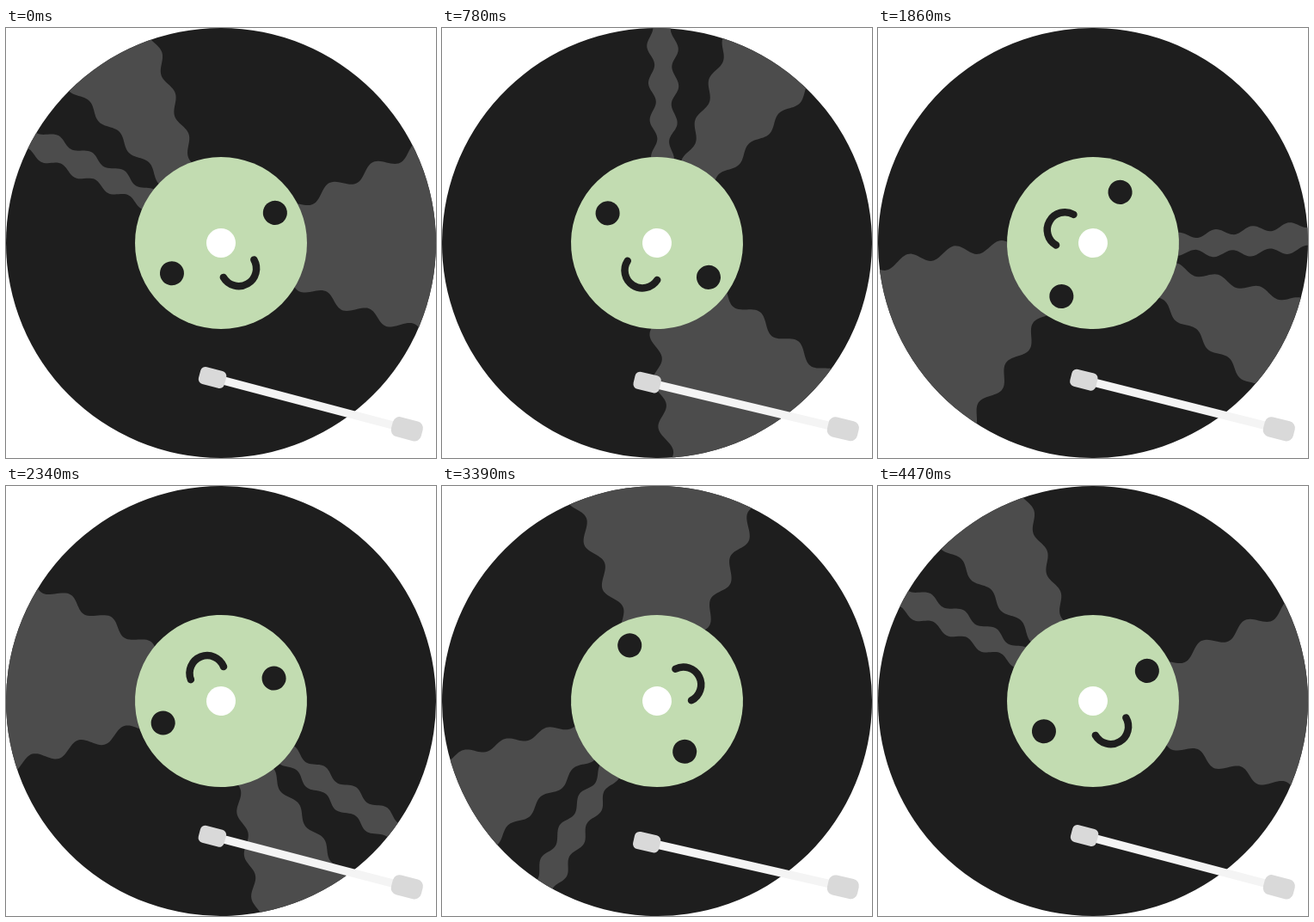
Animation, 500 px wide and 500 px high, one loop 4.5 s. Source, as an HTML page with a canvas:

```html
<!DOCTYPE html>
<html lang="en">
<head>
<meta charset="utf-8">
<title>Smiling record</title>
<style>
  html, body { margin: 0; width: 100%; height: 100%; overflow: hidden; background: #fff; }
  canvas { display: block; }
</style>
</head>
<body>
<canvas id="stage" width="500" height="500"></canvas>
<script>
const ctx = document.getElementById('stage').getContext('2d');
const TAU = Math.PI * 2, DEG = Math.PI / 180;
const STEP = 30, STEPS = 150;
const DISC = 250, LABEL = 100;

// A wavy spoke: its angle at the label and at the rim, and a cosine ripple
// of the given length and height with one crest at radius `crest`.
const edge = (inner, outer, length, crest, height) => r => {
  const angle = (inner + (outer - inner) * (r - LABEL) / (DISC - LABEL)) * DEG;
  const ripple = height * Math.cos(TAU * (r - crest) / length);
  const c = Math.cos(angle), s = Math.sin(angle);
  return [r * c - ripple * s, r * s + ripple * c];
};

const shines = [
  shine(edge(-26.4, -25.8, 56, 116, 7), edge(28.5, 24, 54, 107, 6.5)),
  shine(edge(-133.8, -134, 50, 225, 4.5), edge(-108.5, -108.3, 50, 132, 4.5)),
  shine(edge(-143.5, -148.3, 43, 184, 4), edge(-154.5, -154.8, 43, 186, -4))
];

function shine(from, to) {
  const path = new Path2D();
  for (let r = 90; r <= 300; r += 2) path.lineTo(...from(r));
  for (let r = 300; r >= 90; r -= 2) path.lineTo(...to(r));
  return path;
}

function dot(x, y, r, color) {
  ctx.fillStyle = color;
  ctx.beginPath();
  ctx.arc(x, y, r, 0, TAU);
  ctx.fill();
}

function block(x, w, h, r, color) {
  ctx.fillStyle = color;
  ctx.beginPath();
  ctx.roundRect(x - w / 2, -h / 2, w, h, r);
  ctx.fill();
}

function drawRecord(angle) {
  ctx.save();
  ctx.translate(250, 250);
  ctx.rotate(angle);
  dot(0, 0, DISC, '#1e1e1e');
  ctx.save();
  ctx.clip();
  ctx.fillStyle = '#4c4c4c';
  shines.forEach(path => ctx.fill(path));
  ctx.restore();

  dot(0, 0, LABEL, '#c2dcb1');
  dot(0, 0, 17, '#fff');
  ctx.rotate(-30 * DEG);
  dot(72, 1, 14, '#1e1e1e');
  dot(-67, 2, 14, '#1e1e1e');
  ctx.strokeStyle = '#1e1e1e';
  ctx.lineWidth = 8.5;
  ctx.lineCap = 'round';
  ctx.beginPath();
  ctx.arc(3, 36, 20.5, 0, Math.PI);
  ctx.stroke();
  ctx.restore();
}

function drawArm(angle) {
  ctx.save();
  ctx.translate(466.3, 466.3);
  ctx.rotate(angle);
  block(-117, 220, 9.5, 0, '#f4f4f4');
  block(0, 36, 23.5, 8, '#d9d9d9');
  block(-234, 31, 20.5, 6, '#d9d9d9');
  ctx.restore();
}

function draw(now) {
  const turn = Math.floor(now / STEP) % STEPS / (STEPS - 1);
  const swing = 1 - Math.abs(1 - 2 * (turn * 2 % 1));
  ctx.clearRect(0, 0, 500, 500);
  drawRecord(turn * TAU);
  drawArm((14.8 - 2 * swing) * DEG);
  requestAnimationFrame(draw);
}
requestAnimationFrame(draw);
</script>
</body>
</html>
```
